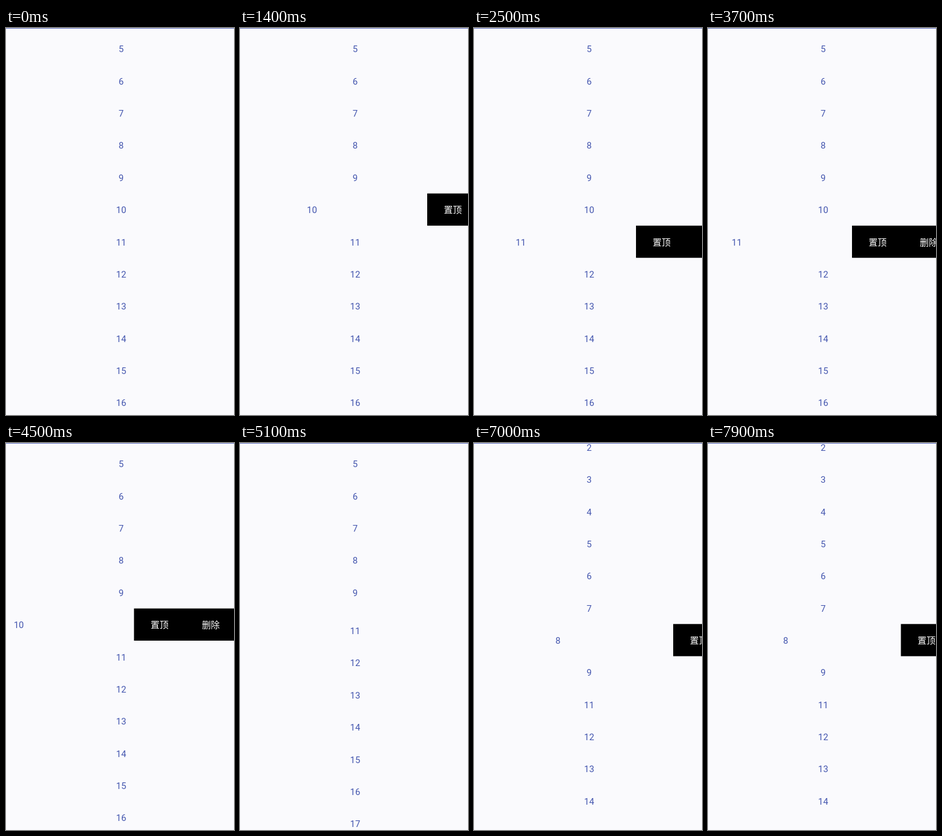
Write an HTML page with a canvas that moves like this. It is 380 by 642 pixels and loops after 8 s.

```html
<!DOCTYPE html>
<html lang="zh">
<head>
<meta charset="utf-8">
<title>Swipe list</title>
<style>
html, body { margin: 0; width: 100%; height: 100%; overflow: hidden; background: #fafafd; }
canvas { display: block; }
</style>
</head>
<body>
<canvas id="stage" width="380" height="642"></canvas>
<script>
const ctx = document.getElementById('stage').getContext('2d');
const LOOP = 8000, TICK = 100;
const ROW_W = 384, ROW_H = 53.36, BUTTON_W = 85.33, OPEN = 2 * BUTTON_W;
const FIRST_Y = 34.4; // centre of row 5 at rest

// Segments: [start, end, from, to, ease-out power]
const swipes = {
  8: [[6900, 7100, 0, 104, 1], [7100, 7400, 104, OPEN, 3], [7900, 8000, 62.5, 62.5, 1]],
  10: [[1400, 1700, 72, OPEN, 2], [1900, 2300, OPEN, 0, 2], [4000, 4500, 0, OPEN, 2]],
  11: [[2500, 2800, 114, OPEN, 3], [3700, 4000, 144, 0, 2]]
};
const scrolls = [[5850, 6100, 0, 107.7, 2], [6200, 6900, 107.7, -132.5, 2]];

const clamp = x => Math.min(1, Math.max(0, x));

function track(segments, t) {
  let value = 0;
  for (const [start, end, from, to, power] of segments) {
    if (t < start) break;
    const p = clamp((t - start) / (end - start));
    value = from + (to - from) * (1 - Math.pow(1 - p, power));
  }
  return value;
}

function label(text, x, y, color) {
  ctx.fillStyle = color;
  ctx.fillText(text, x, y + 6);
}

function drawRow(n, y, offset) {
  ctx.font = '14.93px Roboto, sans-serif';
  label(n, ROW_W / 2 - offset, y, '#4355ae');
  if (offset <= 0) return;
  const left = ROW_W - offset;
  ctx.fillStyle = '#000';
  ctx.fillRect(left, y - ROW_H / 2, OPEN, ROW_H);
  ctx.font = '14.93px "Noto Sans CJK SC", "Noto Sans CJK", sans-serif';
  label('置顶', left + BUTTON_W / 2, y, '#fff');
  label('删除', left + BUTTON_W * 1.5, y, '#fff');
}

function draw(t) {
  ctx.fillStyle = '#fafafd';
  ctx.fillRect(0, 0, 380, 642);
  ctx.textAlign = 'center';
  const scroll = track(scrolls, t);
  // Row 10 fades out, then the rows below close the gap
  const fade = 1 - clamp((t - 4790) / 120);
  const gap = (1 - Math.cos(Math.PI * clamp((t - 4921) / 250))) / 2;
  for (let n = 1; n <= 30; n++) {
    if (n === 10 && fade === 0) continue;
    const y = FIRST_Y + (n - 5 - (n > 10 ? gap : 0)) * ROW_H - scroll;
    if (y < -40 || y > 690) continue;
    ctx.globalAlpha = n === 10 ? fade : 1;
    drawRow(n, y, swipes[n] ? track(swipes[n], t) : 0);
  }
  ctx.globalAlpha = 1;
  ctx.fillStyle = '#6474c2';
  ctx.fillRect(0, 0, 380, 1);
}

const begin = performance.now();
function frame() {
  const t = (performance.now() - begin) % LOOP;
  draw(Math.floor(t / TICK) * TICK);
  requestAnimationFrame(frame);
}
frame();
</script>
</body>
</html>
```
